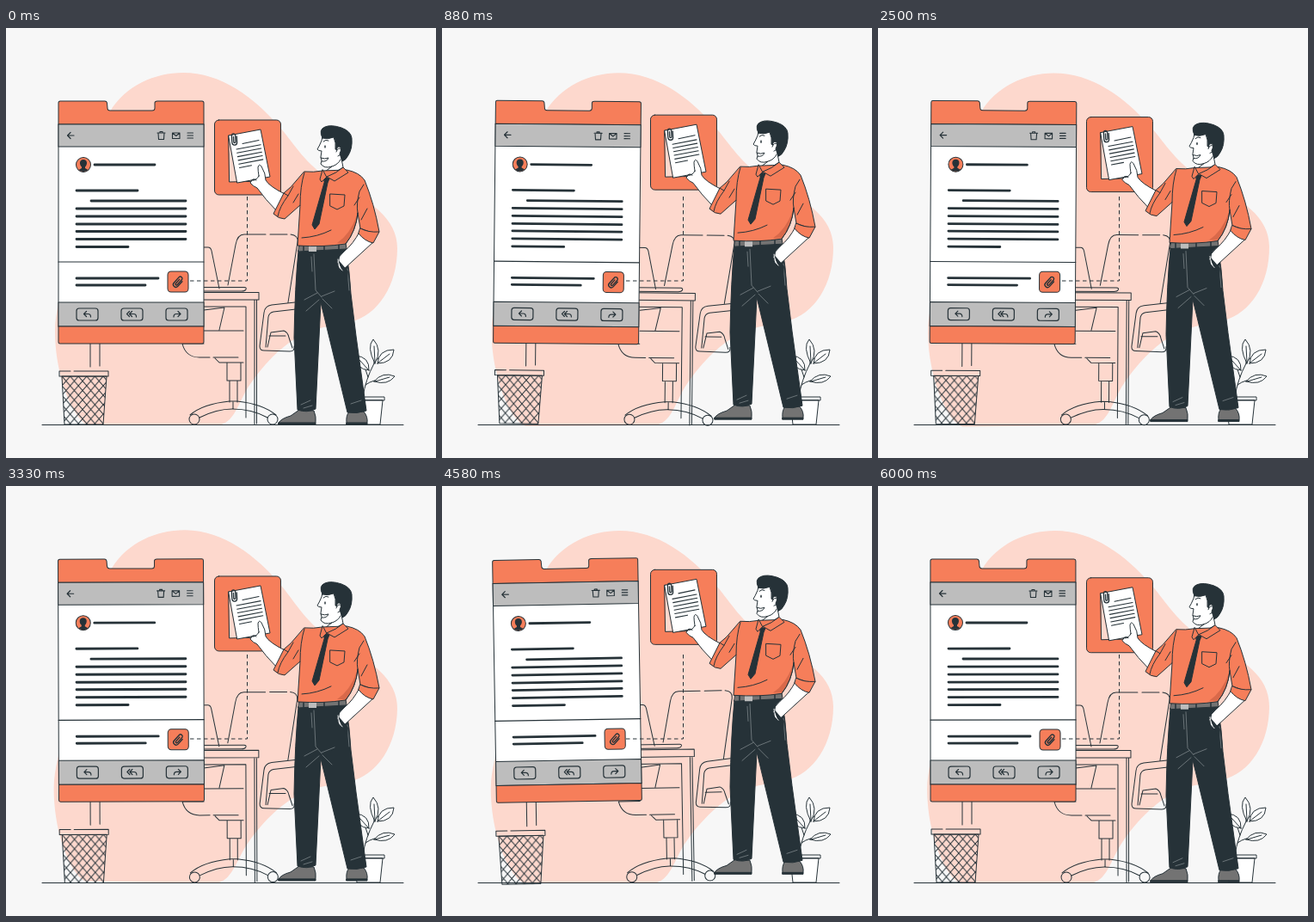
An HTML page that plays this animation: 500 by 500 pixels, repeating every 6.04 s.

```html
<!DOCTYPE html>
<html lang="en">
<head>
<meta charset="utf-8">
<title>Mail attachment</title>
<style>
html, body { margin: 0; height: 100%; overflow: hidden; background: #f7f7f7; }
svg { display: block; width: 100vw; height: 100vh; }
.ln { fill: none; stroke: #263238; stroke-width: 1; stroke-linecap: round; stroke-linejoin: round; }
.o { fill: #f67e5a; }
.w { fill: #fff; }
.g { fill: #bdbdbd; }
.d { fill: #263238; }
.pink { fill: #fdd8cd; }
.thick { stroke-width: 2.8; }
.fold { stroke: #7d868a; stroke-width: .8; }
</style>
</head>
<body>
<svg viewBox="0 0 500 500">
  <defs>
    <pattern id="mesh" width="9.6" height="11" x="65" y="405" patternUnits="userSpaceOnUse">
      <path d="M-.96-1.1L10.56 12.1M-.96 12.1L10.56-1.1" stroke="#263238"/>
    </pattern>
    <path id="clip" d="M2.9-3V4.2A2.9 2.9 0 0 1-2.9 4.2V-4.6A2.2 2.2 0 0 1 1.3-4.6V3.4A1 1 0 0 1-.9 3.4V-2.6"/>
    <path id="reply" d="M-1-3L-4 0L-1 3M-4 0H1Q4 0 4 3.4"/>
  </defs>

  <path id="blob" class="pink" d="M121 97C139 67 173 52 206 52C250 52 288 80 319 116C336 136 348 158 378 177C425 201 455 222 455 256C455 299 433 334 400 342C383 346 366 347 350 354C325 365 302 388 284 414C270 434 266 462 244 462H96C78 455 57 405 57 352C58 310 79 270 86 225C92 180 103 126 121 97Z"/>

  <g id="office" class="ln">
    <!-- chair -->
    <path d="M258 299L267 252Q269 240 277 240H302M307 240H327M331 240Q340 241 339 249L328 319M336 319L309 322Q301 323 300 331L295 370Q295 375 300 375L330 376Q336 376 335 370M337 327L311 330Q306 331 305 336L302 371M304 371L308 354L323 352Q328 354 329 360L333 372M306 358H325"/>
    <path d="M230 328L254 325L248 351M230 352H276M205 367Q209 383 225 383H237M241 383H270M205 367H230M243 384L248 389H276M257 389V410H273V389M260 410V435M269 410V435"/>
    <path d="M214 450Q229 437 260 434H269Q298 437 314 450M225 453Q245 443 263 443Q286 443 304 453M264 435V443"/>
    <circle cx="219" cy="455" r="6"/><circle cx="310" cy="455" r="6"/>
    <!-- desk and laptop -->
    <path d="M98 360V394M109 360V393M222 307.500H294V316H222M222 324H279V453M289 316V461M291.500 316V460M222 255H235Q238 255 239 259L248 303M222 301.500H277Q280 301.500 279 304Q278 306 274 306H222"/>
    <!-- bin -->
    <path d="M65 405L68 461H113L117 405Z" style="fill:url(#mesh)"/>
    <path d="M75 399H62V405H119V399H79"/>
  </g>

  <g id="phone" class="ln">
    <path class="w" d="M61 112H230V347H61Z"/>
    <path class="o" d="M61 112V87Q61 85 63 85H115Q117 85 117.500 87L118 93Q118 96 121 96H170Q173 96 173 93V87Q173 85 176 85H228Q230 85 230 87V112Z"/>
    <path class="g" d="M61 112H230V138H61ZM61 319H230V347H61Z"/>
    <path class="o" d="M61 347H230V365Q230 367 228 367H63Q61 367 61 365Z"/>
    <path d="M61 272H230M79 125H71.500M75 121.500L71.500 125L75 128.500M211 122H217.500M211 125H217.500M211 128H217.500" stroke-width="1.2"/>
    <path d="M176 122H185M179 122V120.500H182V122M177 122L177.500 129.500H183.500L184 122M193.500 122H202V128.500H193.500ZL197.800 125.500L202 122" stroke-width="1.1"/>
    <circle class="o" cx="90" cy="159" r="8.500"/>
    <path class="d" stroke="none" d="M90 153C95 153 95 159 92 161.500V163L95.500 165Q90 169 84.500 165L88 163V161.500C85 159 85 153 90 153Z"/>
    <g id="text" class="thick"></g>
    <rect class="o" x="188" y="283" width="24" height="24" rx="4"/>
    <use href="#clip" transform="translate(200.500 295) rotate(42) scale(1.05)" stroke-width="1.300"/>
    <g stroke-width="1.200">
      <rect x="82" y="326" width="25" height="14" rx="3"/>
      <rect x="134" y="326" width="25" height="14" rx="3"/>
      <rect x="186" y="326" width="25" height="14" rx="3"/>
      <use href="#reply" x="94.500" y="332.500"/>
      <use href="#reply" x="147.500" y="332.500"/>
      <path d="M143.500 329.500L140.500 332.500L143.500 335.500"/>
      <use href="#reply" transform="translate(199 332.500) scale(-1 1)"/>
    </g>
  </g>

  <path class="ln" d="M280.500 196V294H212" stroke-dasharray="4.500 3.500" style="stroke-linecap:butt"/>
  <path class="ln" d="M42 461.500H462"/>

  <!-- plant -->
  <g class="ln">
    <path class="w" d="M405 433L408 461H435L438 433ZM402 429H440V433H402Z"/>
    <path d="M415 429Q418 409 428 390Q433 380 444 380M428 390V372M421 406L416 391M418 415Q427 408 443 408"/>
    <path class="w" d="M429 390Q419 371 427 362Q438 374 429 390ZM432 390Q433 374 451 374Q450 390 432 390ZM422 398Q407 397 406 381Q423 382 422 398ZM428 411Q438 399 452 405Q444 416 428 411Z"/>
    <path d="M429 388L428 370M433 389L446 379M421 397L411 386M429 411L446 406"/>
  </g>

  <g id="man" class="ln">
    <rect class="o" x="242.500" y="107" width="77" height="87" rx="5"/>
    <!-- sheets -->
    <path class="pink" d="M259 125L293 124L300 178L260 179Z"/>
    <path class="w" d="M259 125L296 118L307 173L269 180Z"/>
    <path id="lines" stroke-width="1.100"/>
    <use href="#clip" transform="translate(265.500 129) rotate(-3)" stroke-width="1.300"/>

    <!-- legs -->
    <path fill="#737373" d="M317 459Q320 454 331 451L341 444L358 445Q361 452 360 459ZM396 459Q395 451 399 446L416 446Q421 452 420 459Z"/>
    <path class="d" d="M317 459H360V461H317ZM396 459H420V461H396Z"/>
    <path class="d" d="M340 259L395 257Q400 285 401 309L407 358L419 445Q408 449 397 447L366 319L360 443Q350 448 339 444L335 360Q336 300 340 259Z"/>
    <path class="fold" d="M358 263L360 305L367 313M355 266L356 283M362 308L347 316M349 329L364 316M367 312L382 306M368 315L379 326M397 280L399 305M343 438L354 433M401 437L413 433M356 439L346 442"/>
    <path fill="#737373" d="M341 253L395 250L396 257L340 260Z"/>
    <path class="g" d="M352 252.500L361 252V260H352Z" stroke="none"/>
    <path stroke-width="1.500" d="M346 253V259M370 252V259M387 251V258"/>

    <!-- arm in pocket -->
    <path class="w" d="M411 237Q404 251 393 260Q386 266 385 272Q386 280 391 282L427 249Z"/>
    <path d="M388 263L386 276"/>
    <path class="d" d="M385 268L390 282L397 292L398 283Z" stroke="none"/>
    <path stroke="#fff" stroke-width=".9" d="M386 269Q387 278 391 282"/>

    <!-- raised forearm -->
    <path class="w" d="M294 172Q293 166 293 162Q294 157 297 161Q302 169 302 177Q306 184 324 193L315 213Q302 200 292 186Q287 184 284 180L286 177Q291 178 294 172Z"/>
    <path d="M285 178Q287 174 291 177"/>

    <!-- neck and head -->
    <path class="w" d="M368 126L367 131Q364 138 362 141Q363 143 367 143L366 150Q368 155 366 158Q370 164 379 161L371 167L374 173L392 162L390 152Q396 139 392 126Z"/>
    <path class="d" d="M368 128Q363 118 371 115Q378 112 390 116Q401 120 402 128Q403 140 398 148Q395 154 391 155L388 146Q391 140 388 138Q384 138 385 142L383 141Q384 133 381 127Q374 130 368 128Z"/>
    <path d="M369 132Q372 129 375 131M384 144Q386 138 390 141Q391 147 386 149M366 151Q371 153 375 151Q373 156 367 155M379 161Q386 159 389 153"/>
    <ellipse class="d" cx="371" cy="138" rx=".8" ry="1.800" stroke="none"/>

    <!-- shirt -->
    <path class="o" d="M347 167Q358 168 368 166L396 165Q411 168 417 177Q428 204 434 237L431 240L412 233L409 215Q407 236 395 251Q369 255 339 253L342 206L324 222Q317 222 311 216L323 192L331 185Z"/>
    <path fill="#d9694a" stroke="none" d="M408 218Q400 240 385 250L395 250Q406 238 408 218Z"/>
    <path d="M347 168Q342 184 342 206M409 215Q407 205 411 190L416 182M409 215Q407 236 395 251M323 192L328 195Q318 208 316 219M334 184L328 195M340 193L334 203M344 244Q362 243 378 235M411 197L405 206M413 223L420 210"/>
    <path class="o" d="M412 233Q421 238 434 237L427 250Q417 248 410 239Z"/>
    <path class="o" d="M377 193L394 194L393 207L385 211L377 207Z"/>
    <path class="d" d="M370 174L376 175L374 180L364 228L359 234L356 229L370 180Z"/>
    <path class="o" d="M368 165L365 176L367 179L373 173L382 178L398 168L392 162Q384 169 373 173Z"/>
  </g>
</svg>
<script>
const $ = id => document.getElementById(id);
const LOOP = 6040;

// Mail text: x1, x2, y
const rows = [[103, 173, 159], [82, 153, 189], [99, 209, 201], [82, 209, 210], [82, 209, 219],
  [82, 209, 228], [82, 209, 236.5], [82, 209, 245.5], [82, 142, 254.5], [82, 177, 291], [82, 162, 299]];
$('text').innerHTML = rows.map(([a, b, y]) => `<path d="M${a} ${y}H${b}"/>`).join('');

// Slanted lines on the held sheet
let d = 'M275 134.500L294 130.500';
for (let i = 0; i < 6; i++) {
  const x = 268 + i * .7, y = 141 + i * 4.3, w = i < 5 ? 28 : 14;
  d += `M${x} ${y}l${w} ${-w * .19}`;
}
$('lines').setAttribute('d', d);

// Linear sway 0, 1, -1, 0
const sway = u => u < .25 ? 4 * u : u < .75 ? 2 - 4 * u : 4 * u - 4;
const move = (id, value) => $(id).setAttribute('transform', value);
const start = performance.now();

function draw() {
  const t = (performance.now() - start) % LOOP / LOOP;
  const lift = 10 * (1 - Math.abs(1 - 2 * (t * 2 % 1)));
  move('blob', `rotate(${sway(t * 4 % 1)} 256 257)`);
  move('office', `rotate(${sway(t)} 198 351)`);
  move('phone', `rotate(${sway(t)} 145.5 226)`);
  move('man', `translate(0 ${-lift})`);
  requestAnimationFrame(draw);
}
draw();
</script>
</body>
</html>
```
